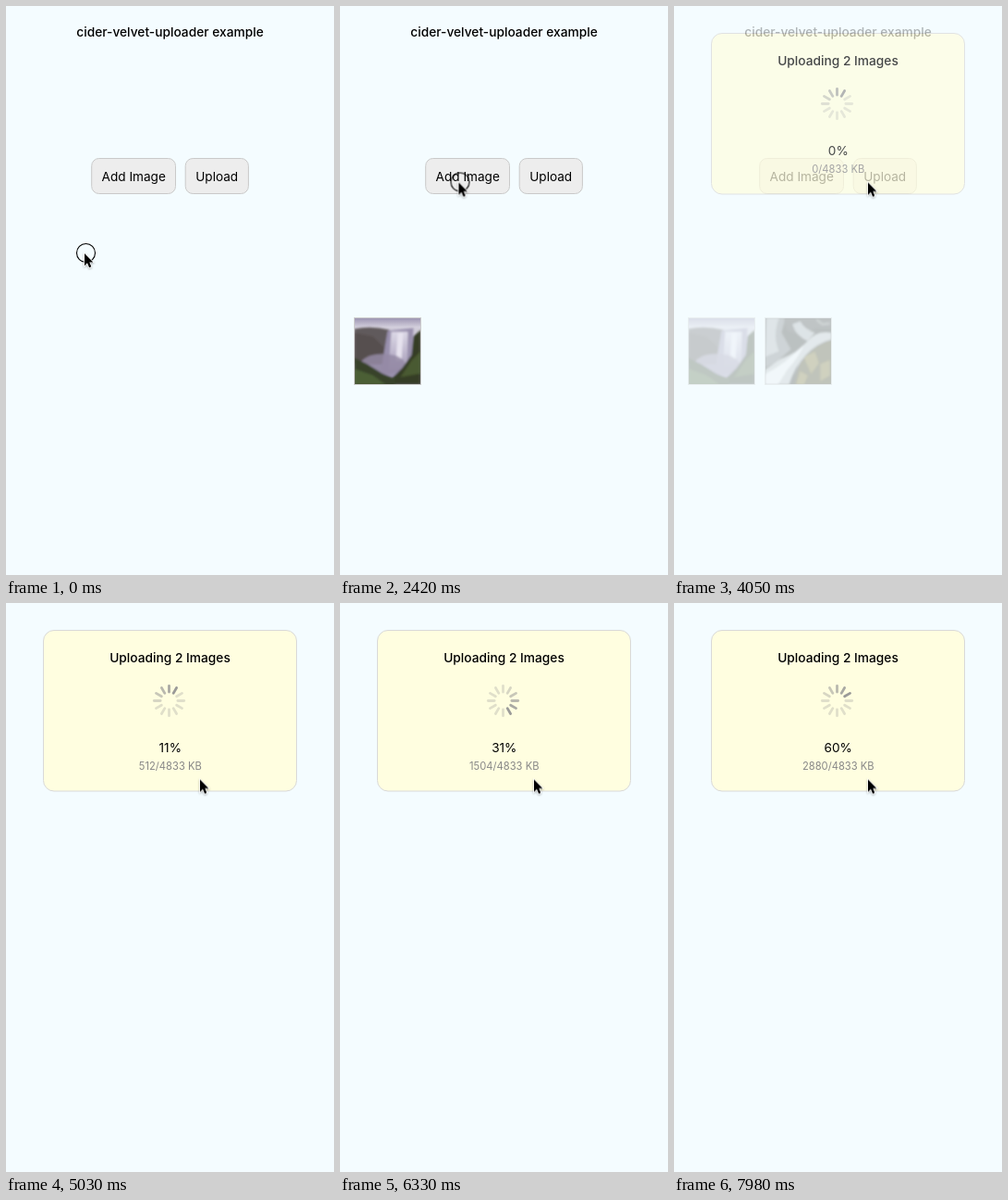
Write an HTML page that moves like this. It is 355 by 614 pixels and loops after 8000 ms.

```html
<!DOCTYPE html>
<html lang="en">
<head>
<meta charset="utf-8">
<title>Uploader example</title>
<style>
  html, body { margin: 0; width: 100%; height: 100%; overflow: hidden; background: #f4fcff; }
  svg { display: block; width: 355px; height: 614px; }
  text { font: 400 13.6px Inter, "Liberation Sans", sans-serif; text-anchor: middle; fill: #000; }
  .head { font-size: 13.75px; font-weight: 500; }
  .small { font-size: 11.2px; fill: #888; }
  .btn rect { fill: #ededed; stroke: #c9c9c9; }

  #cursor, #ring, #add, #send, .thumb, #modal { animation: 8s linear infinite; }
  #cursor { animation-name: move; }
  #ring { animation-name: click; animation-timing-function: step-end; }
  #add { animation-name: press-add; }
  #send { animation-name: press-send; }
  #thumb1 { animation-name: show1; }
  #thumb2 { animation-name: show2; }
  #modal { animation-name: fade; }

  @keyframes move {
    0% { transform: translate(85px, 267px); }
    13.5% { transform: translate(85px, 267px); animation-timing-function: ease-in-out; }
    21.125% { transform: translate(129px, 195.5px); }
    22.125% { transform: translate(129.5px, 182px); }
    23.25%, 36.375% { transform: translate(128.5px, 190.5px); animation-timing-function: ease-in-out; }
    40.375%, 100% { transform: translate(210px, 190.5px); }
  }
  @keyframes click {
    0%, 23.875%, 29.125%, 45.625% { opacity: 1; }
    0.375%, 25.5%, 30.75%, 47.25%, 100% { opacity: 0; }
  }
  @keyframes press-add {
    0%, 23.875%, 26.875%, 100% { opacity: 1; }
    24.6%, 25.6% { opacity: .5; }
  }
  @keyframes press-send {
    0%, 45.625%, 48.6%, 100% { opacity: 1; }
    46.4%, 47.3% { opacity: .5; }
  }
  @keyframes show1 {
    0%, 25.5% { opacity: 0; }
    26.875%, 100% { opacity: 1; }
  }
  @keyframes show2 {
    0%, 30.75% { opacity: 0; }
    32.625%, 100% { opacity: 1; }
  }
  @keyframes fade {
    0%, 47.5% { opacity: 0; }
    51.875%, 100% { opacity: 1; }
  }
</style>
</head>
<body>
<svg viewBox="0 0 355 614">
  <defs>
    <clipPath id="frame"><rect width="72" height="72"/></clipPath>
    <filter id="soft" x="-20%" y="-20%" width="140%" height="140%"><feGaussianBlur stdDeviation="1"/></filter>
    <filter id="shade" x="-50%" y="-30%" width="200%" height="180%">
      <feDropShadow dx="0" dy="1" stdDeviation=".8" flood-opacity=".35"/>
    </filter>
    <linearGradient id="sky" x2="0" y2="1">
      <stop offset="0" stop-color="#9a92b0"/>
      <stop offset=".14" stop-color="#d3cfdc"/>
      <stop offset="1" stop-color="#8d83a0"/>
    </linearGradient>
    <linearGradient id="fall" x2="0" y2="1">
      <stop offset="0" stop-color="#dcd8e6"/>
      <stop offset="1" stop-color="#a59bb8"/>
    </linearGradient>
  </defs>

  <text class="head" x="177.5" y="32.5">cider-velvet-uploader example</text>

  <g id="add" class="btn">
    <rect x="92.7" y="164.5" width="90.8" height="38" rx="8"/>
    <text x="138.2" y="188.5">Add Image</text>
  </g>
  <g id="send" class="btn">
    <rect x="194.2" y="164.5" width="68.2" height="38" rx="8"/>
    <text x="228.2" y="188.5">Upload</text>
  </g>

  <g id="thumb1" class="thumb">
    <g transform="translate(15.5 336.5)">
      <g clip-path="url(#frame)">
        <rect width="72" height="72" fill="url(#sky)"/>
        <g filter="url(#soft)">
          <path d="M0 12Q18 8 38 13V50H0Z" fill="#615a5c"/>
          <path d="M0 16L20 20 32 32 34 50H0Z" fill="#57504f"/>
          <path d="M36 14L64 11 62 46 50 62H28Z" fill="#9990ad"/>
          <path d="M40 15H58L57 56H37Z" fill="url(#fall)"/>
          <path d="M47 16H53L51 46H45Z" fill="#e6e2ee"/>
          <ellipse cx="31" cy="50" rx="24" ry="11" fill="#948aa5" opacity=".85"/>
          <path d="M72 13L64 20 62 40 52 54 42 64 38 72H72Z" fill="#343e26"/>
          <path d="M72 36L62 46 50 64 72 60Z" fill="#4a5a30"/>
          <path d="M0 43L14 50 30 60 44 66V74H0Z" fill="#37432a"/>
          <path d="M0 55L20 62 34 72H0Z" fill="#4b5f36"/>
        </g>
      </g>
      <rect width="72" height="72" fill="none" stroke="#ccc"/>
    </g>
  </g>

  <g id="thumb2" class="thumb">
    <g transform="translate(98.5 336.5)">
      <g clip-path="url(#frame)">
        <rect width="72" height="72" fill="#2c2a24"/>
        <g filter="url(#soft)">
          <path d="M0 0H22L18 16 28 34 12 48 0 54Z" fill="#6d6d6f"/>
          <path d="M2 0H15Q8 20 15 36L0 42Z" fill="#a9aaad"/>
          <path d="M20 0H72V11L56 11 36 18 24 14Z" fill="#393631"/>
          <path d="M40 34L72 22V72H32Z" fill="#3d360f"/>
          <path d="M42 42L54 37 58 49 50 60ZM38 58L46 62 42 72H34ZM60 50L70 46V62L60 68Z" fill="#75651a"/>
          <path d="M72 16Q56 13 46 25T16 45L0 56V72H26Q32 53 44 40T72 23Z" fill="#b8b9bb"/>
          <path d="M38 4Q43 13 54 16L46 25Q34 20 30 7Z" fill="#a5a6a9"/>
          <path d="M0 61Q22 50 42 29Q37 42 24 56L14 72H0Z" fill="#ececee"/>
          <path d="M56 2L62 7 70 6" fill="none" stroke="#77756f" stroke-width="2"/>
        </g>
      </g>
      <rect width="72" height="72" fill="none" stroke="#ccc"/>
    </g>
  </g>

  <g id="modal">
    <rect width="355" height="614" fill="#f4fcff"/>
    <rect x="40.5" y="29.5" width="274" height="173.5" rx="11.5" fill="#fffee0" stroke="#d9d9d9"/>
    <text class="head" x="177.5" y="63.5">Uploading 2 Images</text>
    <g id="spinner" transform="translate(176.5 105.5)" stroke="#929292" stroke-width="2.8" stroke-linecap="round"></g>
    <text id="percent" x="177.8" y="160.5">0%</text>
    <text id="bytes" class="small" x="177.8" y="179.5">0/4833 KB</text>
  </g>

  <g id="cursor">
    <circle id="ring" cx="1.5" cy="-.5" r="10" fill="none" stroke="#000" stroke-width="1.1"/>
    <path d="M0 0V13.2L3 10.3 5.1 15.2 7.3 14.3 5.3 9.4H9.3Z" stroke="#fff" stroke-width="1.3"
      paint-order="stroke" filter="url(#shade)"/>
  </g>
</svg>
<script>
  const LOOP = 8000, TOTAL = 4833, CHUNK = 32;
  const $ = id => document.getElementById(id);
  const progress = [[4360, 0], [5030, 518], [6330, 1512], [7080, 2184], [7980, 2888], [8000, 2900]];

  const blades = Array.from({ length: 12 }, (_, i) => {
    const line = document.createElementNS("http://www.w3.org/2000/svg", "line");
    line.setAttribute("y1", -9.4);
    line.setAttribute("y2", -16.2);
    line.setAttribute("transform", `rotate(${i * 30})`);
    return $("spinner").appendChild(line);
  });

  function loaded(t) {
    if (t <= progress[0][0]) return 0;
    const i = progress.findIndex(p => p[0] >= t);
    const [t0, a] = progress[i - 1], [t1, b] = progress[i];
    return Math.floor((a + (b - a) * (t - t0) / (t1 - t0)) / CHUNK) * CHUNK;
  }

  function draw() {
    const t = performance.now() % LOOP;
    const kb = loaded(t);
    $("percent").textContent = Math.round(kb / TOTAL * 100) + "%";
    $("bytes").textContent = `${kb}/${TOTAL} KB`;

    const lead = Math.floor(1.5 + (t - 5030) * 0.01254);
    blades.forEach((blade, i) => {
      const age = ((lead - i) % 12 + 12) % 12;
      blade.setAttribute("opacity", Math.max(0.28, 0.92 - age * 0.14));
    });
    requestAnimationFrame(draw);
  }
  draw();
</script>
</body>
</html>
```
